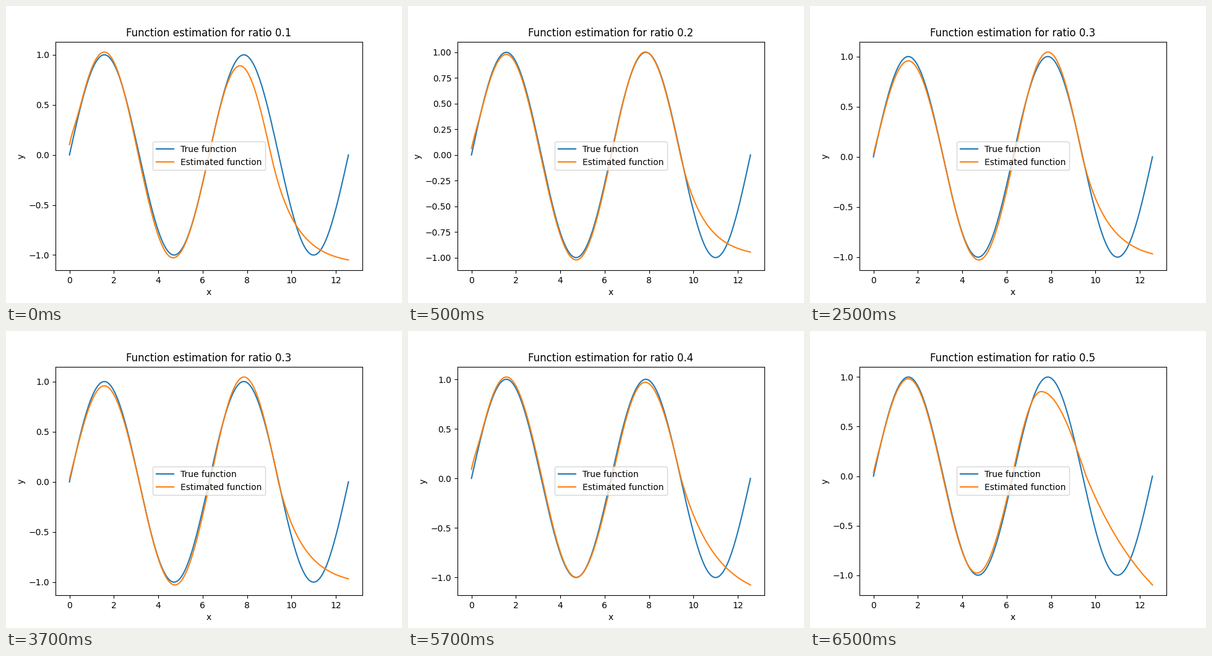
A matplotlib script that plays this animation: 640x480 px, repeating every 8 s.

```python
import numpy as np
import matplotlib.pyplot as plt
from matplotlib.animation import FuncAnimation

INTERVAL = 500
FRAMES = 16
X_END = 4 * np.pi

x = np.linspace(0, X_END, 400)
true_y = np.sin(x)


def estimate(start, turns, heights, decay, end):
    """Three half waves, a soft start and an exponential approach at the end.

    turns: where the wave peaks and crosses zero, a quarter period apart
    heights: amplitude of each half wave
    """
    turns = np.array([0, np.pi / 2, *turns])
    phase = np.interp(x, turns, np.arange(len(turns)) * np.pi / 2)
    half = np.minimum(phase // np.pi, 2).astype(int)
    wave = np.array(heights)[half] * np.sin(phase)
    wave += start * np.exp(-(x / 0.3) ** 2)

    last = turns[-1]
    tail = end * np.expm1((last - x) / decay) / np.expm1((last - X_END) / decay)
    return np.where(x < last, wave, tail)


estimates = [
    estimate(0.103, (3.10, 4.67, 6.285, 7.68, 9.08), (1.028, 1.028, 0.89), 1.10, -1.049),
    estimate(0.063, (3.11, 4.72, 6.31, 7.83, 9.41), (0.98, 1.023, 1.003), 1.05, -0.946),
    estimate(0.025, (3.14, 4.75, 6.335, 7.86, 9.41), (0.957, 1.028, 1.045), 1.15, -0.967),
    estimate(0.093, (3.18, 4.72, 6.335, 7.82, 9.44), (1.023, 0.997, 0.97), 1.60, -1.075),
    estimate(0.035, (3.12, 4.66, 6.25, 7.55, 9.58), (0.983, 0.978, 0.853), 3.50, -1.098),
]

plt.rcParams["font.family"] = "DejaVu Sans"
fig, ax = plt.subplots(figsize=(6.4, 4.8), dpi=100)


def draw(frame):
    step = (frame + 3) // 4
    ax.clear()
    ax.plot(x, true_y, label="True function")
    ax.plot(x, estimates[step], label="Estimated function")
    ax.set_title(f"Function estimation for ratio 0.{step + 1}")
    ax.set_xlabel("x")
    ax.set_ylabel("y")
    ax.legend(loc="center")


anim = FuncAnimation(fig, draw, frames=FRAMES, interval=INTERVAL,
                     init_func=lambda: draw(0), repeat=True, repeat_delay=0)
plt.show()
```
